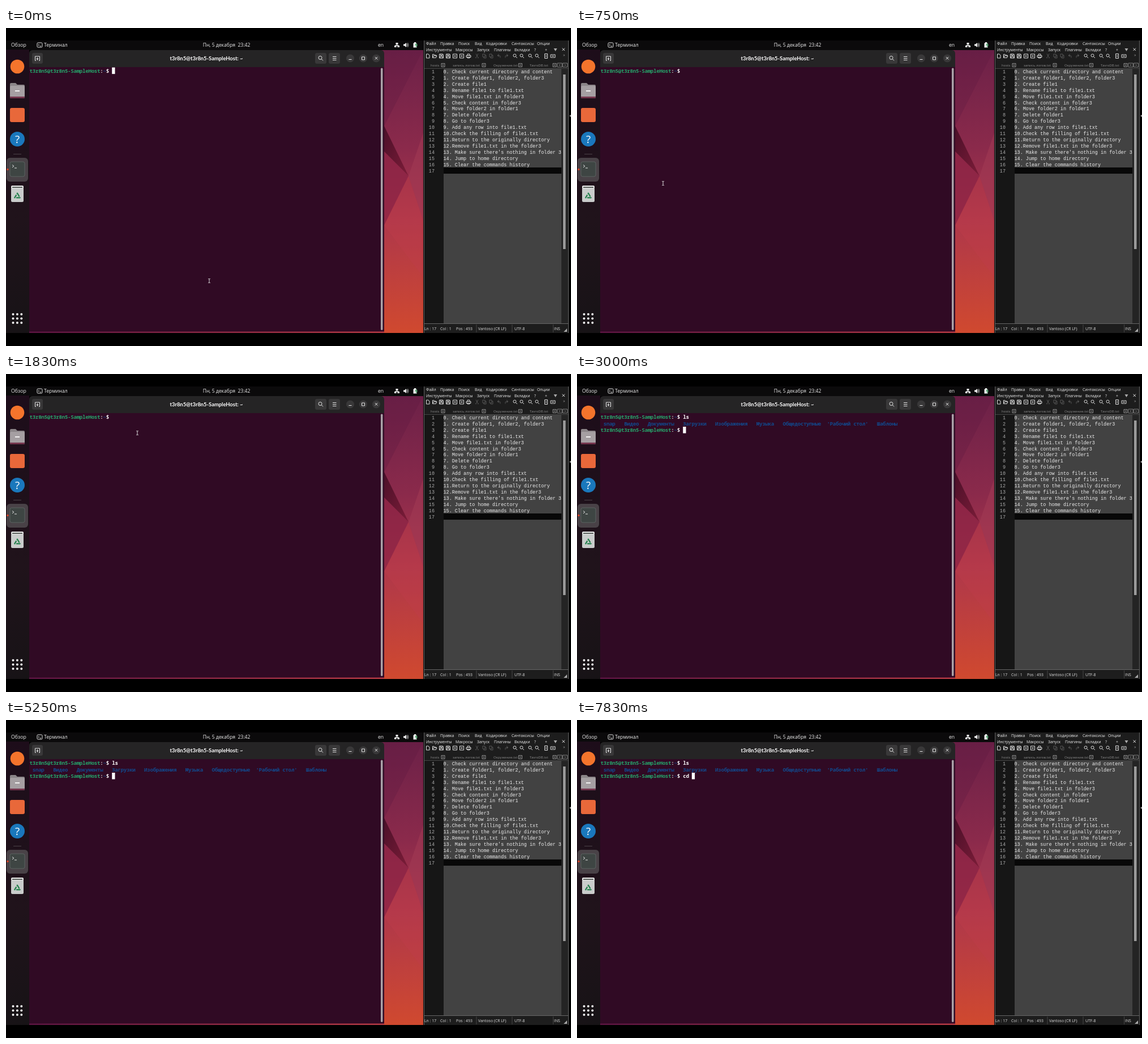
An HTML page that plays this animation: 998x561 px, repeating every 8000 ms.

```html
<!DOCTYPE html>
<html lang="ru">
<head>
<meta charset="utf-8">
<title>Terminal session</title>
<style>
html, body { margin: 0; width: 100%; height: 100%; overflow: hidden; background: #000; }
svg { display: block; width: 100%; height: 100%; }
text { white-space: pre; }
.ui { font-family: "Open Sans", "Noto Sans", sans-serif; }
.title { font: 700 9.4px Lato, "Open Sans", sans-serif; }
.term { font: 700 9.2px "Noto Sans Mono", "DejaVu Sans Mono", monospace; letter-spacing: -.32px; }
.code { font: 8.47px "Liberation Mono", "DejaVu Sans Mono", monospace; }
.line { fill: none; stroke: #e4e4e4; stroke-width: 1; }
</style>
</head>
<body>
<svg viewBox="0 0 998 561" preserveAspectRatio="none">
  <defs>
    <linearGradient id="wall" x2="0" y2="1">
      <stop offset="0" stop-color="#6c2148"/>
      <stop offset=".35" stop-color="#8b2a4b"/>
      <stop offset=".6" stop-color="#ae374b"/>
      <stop offset="1" stop-color="#d0492f"/>
    </linearGradient>
    <linearGradient id="dock" x2="0" y2="1">
      <stop offset="0" stop-color="#1d0d1a"/>
      <stop offset=".6" stop-color="#20131b"/>
      <stop offset="1" stop-color="#171316"/>
    </linearGradient>
    <linearGradient id="edge">
      <stop offset="0" stop-color="#5c1443"/>
      <stop offset="1" stop-color="#b83a45"/>
    </linearGradient>
    <linearGradient id="shade" x2="1" y2="1">
      <stop offset="0" stop-color="#4b1029"/>
      <stop offset="1" stop-color="#7c1c38"/>
    </linearGradient>
  </defs>

  <!-- wallpaper -->
  <path fill="url(#wall)" d="M660 38h77v500h-77z"/>
  <path fill="#a23b55" opacity=".55" d="M737 185L711 261L737 340z"/>
  <path fill="#5d173f" opacity=".3" d="M668 38h69L668 173z"/>
  <path fill="url(#shade)" d="M668 173L711 261L668 218z"/>
  <path fill="#8d2344" opacity=".75" d="M668 218L711 261L668 348z"/>
  <path fill="#bd3d49" opacity=".4" d="M711 261L737 340V440L668 348z"/>
  <path fill="url(#edge)" d="M40 535h628v3H40z"/>

  <!-- top bar and dock -->
  <path fill="#0b0a0b" d="M0 22h737v17H0z"/>
  <path fill="url(#dock)" d="M0 38h41v500H0z"/>
  <g class="line">
    <rect x="55" y="26" width="9" height="8" rx="1.5"/>
    <path d="M57 28.5l1.6 1.5L57 31.5M59.8 32h2.4"/>
  </g>
  <g fill="#eee">
    <path d="M688.5 26h4v3h-4zM686 31h3.5v3H686zM691.5 31h3.5v3h-3.5z"/>
    <path d="M690 28.5h1v1.5h2.5v1.5h-6V30h2.500zM702 28.500h2l3-2.500v8l-3-2.500h-2z"/>
    <path fill="none" stroke="#eee" d="M708 27.500q2 2.500 0 5"/>
    <path fill="none" stroke="#aaa" d="M709.500 26q3 4 0 8"/>
    <path d="M719.500 26.500h1.500v-1.500h3v1.500h1.500v8h-6z"/>
    <path fill="#49a36a" d="M725 26l-3 4.500h2.500l-1 4 4-5H725z"/>
  </g>
  <circle cx="20" cy="68" r="12.3" fill="#f4742c"/>
  <g>
    <path fill="#8b8588" d="M7 99q0-2 2-2h8l3 3h11q2 0 2 2v20H7z"/>
    <rect x="7" y="102" width="26" height="22" rx="2" fill="#a59fa2"/>
    <path fill="#74354d" d="M7 121h26v1q0 2-2 2H9q-2 0-2-2z"/>
    <rect x="16" y="110" width="8" height="2" fill="#f2f0f0"/>
  </g>
  <rect x="7" y="141" width="26" height="25" rx="3" fill="#e8683a"/>
  <circle cx="20" cy="196" r="13" fill="#1a78bc"/>
  <path fill="#4b4248" d="M13 222h14v1H13z"/>
  <rect x="1" y="229" width="38" height="42" rx="6" fill="#494247"/>
  <rect x="7" y="236" width="26" height="26" rx="3" fill="#3e4543" stroke="#5b6260"/>
  <path class="line" d="M11 241.500l3 2.200-3 2.200M15 247h4"/>
  <circle cx="3" cy="249.500" r="1.700" fill="#df4325"/>
  <rect x="9" y="281" width="22" height="26" rx="2.500" fill="#c9cccb"/>
  <rect x="9" y="278" width="22" height="5" rx="2" fill="#e9eae9"/>
  <path fill="#575d5a" d="M11 280h18v2H11z"/>
  <path fill="none" stroke="#23804c" stroke-width="2.300" stroke-dasharray="7 1.700" stroke-linejoin="round" d="M20 291.500l4.700 7.800h-9.400z"/>
  <g id="apps" fill="#f2f2f2"></g>

  <!-- terminal window -->
  <path fill="#300a24" d="M41 68h627v467.500H41z"/>
  <path fill="#252425" d="M41 69V45q0-6 6-6h615q6 0 6 6v24z"/>
  <rect x="662" y="70.500" width="3.500" height="462.500" rx="1.700" fill="#aaa2a8"/>
  <g fill="#393839">
    <rect x="46" y="44" width="19" height="19" rx="3"/>
    <rect x="546" y="44" width="20" height="19" rx="3"/>
    <rect x="570" y="44" width="20" height="19" rx="3"/>
    <circle cx="608" cy="53.500" r="7"/><circle cx="631" cy="53.500" r="7"/><circle cx="654" cy="53.500" r="7"/>
  </g>
  <g class="line">
    <path d="M53 57.500h-1.500v-7.500h8v7.500H58M55.500 52v5M53.500 54.500h4"/>
    <circle cx="555" cy="52.500" r="3"/><path d="M557.200 54.700l2.800 2.800"/>
    <path d="M577 50.500h6.500M577 53.500h6.500M577 56.500h6.500M605.500 55.500h5M628.500 51h5v5h-5zM651.800 51l4.500 4.500M656.300 51l-4.500 4.500"/>
  </g>

  <!-- editor window -->
  <path fill="#1d1d1d" d="M738 22h256v516H738z"/>
  <path fill="#161616" d="M739 72h34v449h-34z"/>
  <path fill="#424242" d="M773 72h208v174H773zM773 257h208v264H773z"/>
  <path fill="#080808" d="M773 246h208v11H773z"/>
  <path fill="#242424" d="M981 72h12v449h-12z"/>
  <rect x="984" y="82" width="4.500" height="308" fill="#9b9b9b"/>
  <path fill="none" stroke="#666" stroke-width="1" d="M738.500 22v516M993.500 22v516M739 521.500h254"/>
  <path fill="none" stroke="#444" stroke-width="1" d="M739 71.500h254M831 523v14M894 523v14M966.500 523v14"/>
  <path fill="#aaa" d="M991 530v6h-6zM995 155l3-2v4zM967.500 36h6l-3 5z"/>
  <path class="line" d="M982.500 35.500l4.500 4.500M987 35.500l-4.500 4.500"/>
  <g id="tools"></g>
  <g id="labels"></g>

  <!-- live part -->
  <g id="prompt2"></g>
  <rect id="block" width="5.300" height="11.500" fill="#fff"/>
  <text id="cmd1" class="term" x="187.200" y="79" fill="#fff"></text>
  <text id="cmd2" class="term" x="187.200" y="102.200" fill="#fff"></text>
  <path id="mouse" fill="none" stroke="#ddd" d="M-1.800-3.500h1.300l.5.500.5-.500h1.300M0-3v6M-1.800 3.500h1.300l.5-.500.5.500h1.300"/>
</svg>
<script>
const NS = 'http://www.w3.org/2000/svg';
const el = id => document.getElementById(id);

function add(parent, tag, attrs, content = '') {
  const node = document.createElementNS(NS, tag);
  for (const key in attrs) node.setAttribute(key, attrs[key]);
  node.textContent = content;
  return parent.appendChild(node);
}

const labels = el('labels');
const write = (x, y, str, size, fill = '#eee', more = {}) =>
  add(labels, 'text', { class: 'ui', x, y, fill, 'font-size': size, ...more }, str);
const row = (items, y, size, fill) => items.forEach(([x, str]) => write(x, y, str, size, fill));
const hard = str => str.replace(/ /g, '\u00a0');

// Desktop labels
const user = 't3r8n5@t3r8n5-SampleHost';
const middle = { 'text-anchor': 'middle' };
row([[9, 'Обзор'], [67, 'Терминал'], [657, 'en']], 33.2, 8.7);
write(389.5, 33.2, 'Пн, 5 декабря\u00a0 23:42', 8.6, '#eee', middle);
write(354, 56.5, user + ': ~', 9.4, '#fff', { ...middle, class: 'title' });
write(20, 203, '?', 19, '#fff', middle);
for (let i = 0; i < 9; i++)
  add(el('apps'), 'circle', { cx: 12.5 + i % 3 * 7.4, cy: 505 + (i / 3 | 0) * 7.5, r: 2 });

// Editor labels
row([[742, 'Файл'], [767, 'Правка'], [799, 'Поиск'], [828, 'Вид'], [848, 'Кодировки'],
  [893, 'Синтаксисы'], [938, 'Опции']], 29.6, 6.9);
row([[742, 'Инструменты'], [794, 'Макросы'], [832, 'Запуск'], [862, 'Плагины'],
  [898, 'Вкладки'], [933, '?'], [952, '+']], 40.6, 6.9);
row([[750, 'hosts'], [789, 'запись логов.txt'], [861, 'Окружение.txt'], [925, 'TavroDB.txt']], 67.6, 6.1, '#8c8c8c');
row([[739, 'Ln : 17'], [767, 'Col : 1'], [795, 'Pos : 493'], [834, 'Vantoso (CR LF)'],
  [898, 'UTF-8'], [968, 'INS']], 533, 6.9, '#ddd');
write(984, 50, '»', 7, '#999');

const tasks = `0. Check current directory and content
1. Create folder1, folder2, folder3
2. Create file1
3. Rename file1 to file1.txt
4. Move file1.txt in folder3
5. Check content in folder3
6. Move folder2 in folder1
7. Delete folder1
8. Go to folder3
9. Add any row into file1.txt
10.Check the filling of file1.txt
11.Return to the originally directory
12.Remove file1.txt in the folder3
13. Make sure there's nothing in folder 3
14. Jump to home directory
15. Clear the commands history
`.split('\n');
tasks.forEach((task, i) => {
  const y = 79.8 + i * 10.94;
  write(757, y, i + 1, 8.47, '#aaa', { class: 'code', 'text-anchor': 'end' });
  write(772.5, y, task, 8.47, '#ececec', { class: 'code' });
});

// Toolbar: x, shape, brightness
const shapes = {
  page: 'M-2.5-3.5h3.500l2 2v5h-5.500z',
  open: 'M-3.500 3v-6h2.500l1 1.500h3v1.500M-3.500 3l1.500-3.500h6l-1.500 3.500z',
  disk: 'M-3.500-3.500h6l1 1v6h-7zM-1.500-3.500v2.500h3v-2.500M-2 3.500v-3h4v3',
  shut: 'M-3.500-3.500h7v7h-7zM-1.500-1.500l3 3M1.500-1.500l-3 3',
  print: 'M-2-1v-2.500h4v2.500M-4-1h8v3h-8zM-2 1v2.500h4v-2.500',
  cut: 'M-2-4l3.500 6M2-4l-3.500 6M-3 3h2M1 3h2',
  copy: 'M-3-3.500h4v5h-4zM-1 1.500v2h4v-5h-2',
  undo: 'M0-3.500l-3 2.500 3 2M-3-1h3q3 0 2 4',
  redo: 'M0-3.500l3 2.500-3 2M3-1h-3q-3 0-2 4',
  find: 'M2-1a2.500 2.500 0 1 1-5 0a2.500 2.500 0 1 1 5 0M1.500 1l2.500 2.500',
  wide: 'M-4-2.500h8v5h-8zM-2 0h4',
  tall: 'M-2.500-4h5v8h-5zM0-2v4'
};
[[745, 'page', 1], [757, 'open', 1], [769, 'disk', 1], [781, 'disk', 1], [793, 'shut', 1], [805, 'shut', 1],
  [817, 'print', 1], [832, 'cut'], [845, 'copy'], [857, 'copy'], [871, 'undo'], [884, 'redo'],
  [899, 'find', 1], [911, 'find', 1], [926, 'find', 1], [938, 'find', 1], [954, 'tall', 1], [966, 'wide', 1]
].forEach(([x, name, on]) => add(el('tools'), 'path', {
  d: shapes[name], transform: `translate(${x} 49.5)`, fill: 'none', stroke: on ? '#ddd' : '#555'
}));
[772, 844, 908.5, 969].forEach(x => add(el('tools'), 'path', {
  d: 'M-3-3h6v6h-6zM-1.300-1.300l2.600 2.600M1.300-1.300l-2.600 2.600',
  transform: `translate(${x} 65.5)`, fill: 'none', stroke: '#aaa', 'stroke-width': .8
}));
[[978, 1], [987.5, -1]].forEach(([x, dir]) => add(el('tools'), 'path', {
  d: 'M-4-3.500h8v7h-8zM1-1.500l-2 1.500 2 1.500',
  transform: `translate(${x} 65.5) scale(${dir} 1)`, fill: 'none', stroke: '#999', 'stroke-width': .8
}));

// Terminal text on a grid of 5.2 by 11.6
function prompt(parent, y) {
  const line = add(parent, 'text', { class: 'term', x: 41.6, y });
  [[user, '#26a269'], [':', '#ddd'], ['~', '#12488b'], ['$', '#fff']]
    .forEach(([str, fill]) => add(line, 'tspan', { fill }, str));
}
prompt(labels, 79);
const output = el('prompt2');
add(output, 'text', { class: 'term', x: 41.6, y: 90.6, fill: '#12488b' }, hard(
  " snap   Видео   Документы   Загрузки   Изображения   Музыка   Общедоступные  'Рабочий стол'   Шаблоны"));
prompt(output, 102.2);

// Key presses: time, active prompt, typed command
const keys = [[0, 0, ''], [2250, 0, 'l'], [2495, 0, 'ls'], [2665, 1, ''],
  [5910, 1, 'c'], [5995, 1, 'cd'], [7412, 1, 'cd ']];
const path = [[0, 359, 446], [750, 152, 274], [1830, 232, 104], [2250, 232, 104]];
const BLINK = 583;

function pointer(t) {
  const i = Math.max(1, path.findIndex(p => p[0] > t));
  const [t0, x0, y0] = path[i - 1], [t1, x1, y1] = path[i];
  const k = (t - t0) / (t1 - t0), e = k * k * (3 - 2 * k);
  return `translate(${x0 + (x1 - x0) * e} ${y0 + (y1 - y0) * e})`;
}

function draw() {
  const t = performance.now() % 8000;
  const [since, second, typed] = keys.filter(k => k[0] <= t).pop();
  el('cmd1').textContent = second ? 'ls' : typed;
  el('cmd2').textContent = second ? hard(typed) : '';
  output.style.display = second ? '' : 'none';

  const block = el('block');
  block.setAttribute('x', 187.2 + typed.length * 5.2);
  block.setAttribute('y', second ? 93 : 69.6);
  block.style.display = Math.floor((t - since) / BLINK) % 2 ? 'none' : '';

  const mouse = el('mouse');
  mouse.style.display = t < 2250 ? '' : 'none';
  if (t < 2250) mouse.setAttribute('transform', pointer(t));
  requestAnimationFrame(draw);
}
draw();
</script>
</body>
</html>
```
